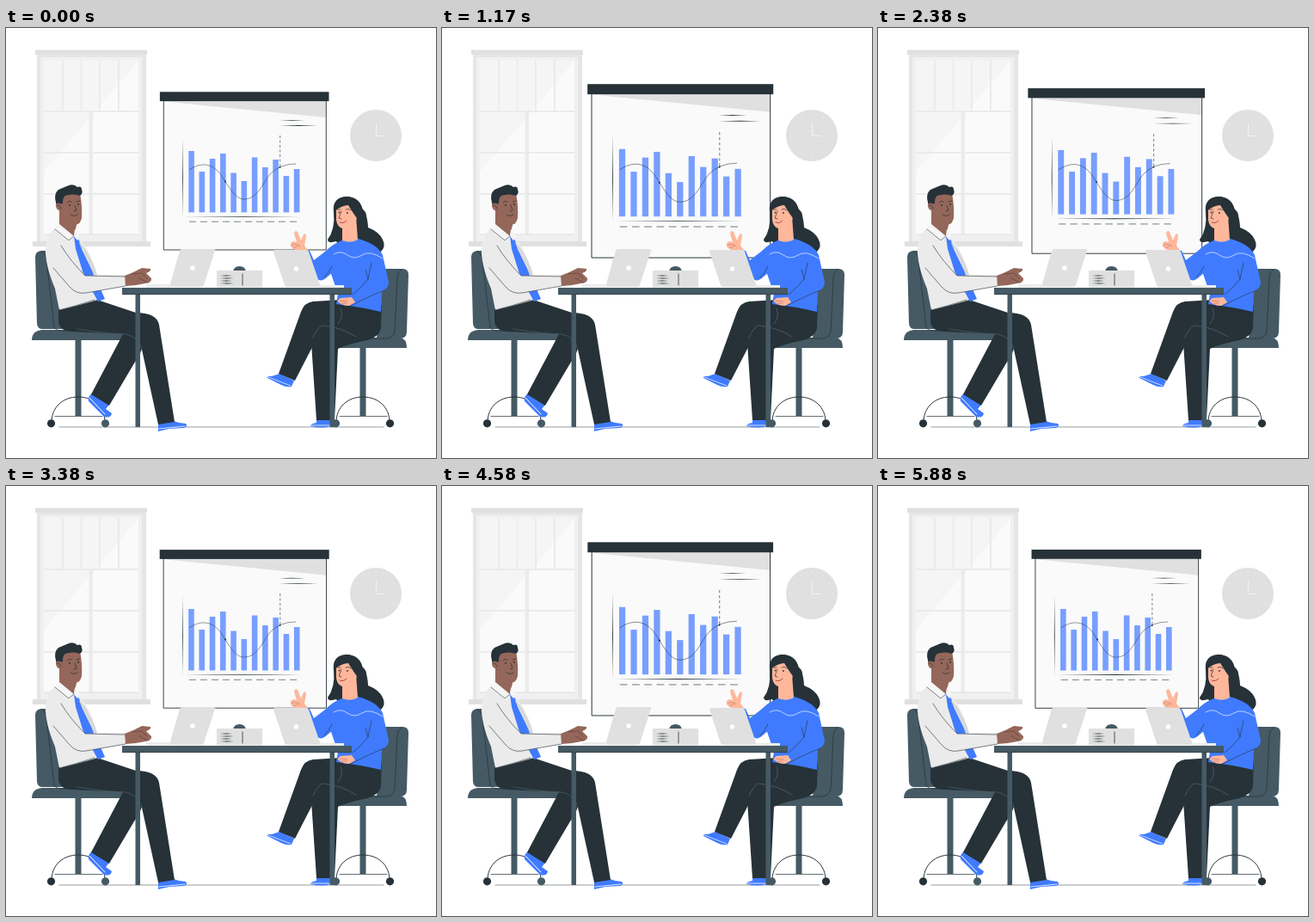
An HTML page with a canvas that plays this animation: 500x500 px, repeating every 5.93 s.

```html
<!DOCTYPE html>
<html lang="en">
<head>
<meta charset="utf-8">
<title>Office presentation</title>
<style>
html, body { margin: 0; width: 100%; height: 100%; overflow: hidden; background: #fff; }
canvas { display: block; width: 100vw; height: 100vh; }
</style>
</head>
<body>
<canvas id="stage" width="500" height="500"></canvas>
<script>
const ctx = document.getElementById('stage').getContext('2d');
const LOOP = 5930;
const DARK = '#263238', SLATE = '#455a64', BLUE = '#407bff', GREY = '#e0e0e0';
const BROWN = '#94675a', PEACH = '#ffb79b', SHIRT = '#ebebeb';

function fill(color, d, g = ctx) {
  g.fillStyle = color;
  g.fill(new Path2D(d));
}
function line(color, width, d, g = ctx, dash = []) {
  g.strokeStyle = color;
  g.lineWidth = width;
  g.setLineDash(dash);
  g.stroke(new Path2D(d));
}
function rect(color, x, y, w, h, g = ctx) {
  g.fillStyle = color;
  g.fillRect(x, y, w, h);
}
function dot(color, x, y, r, g = ctx) {
  g.fillStyle = color;
  g.beginPath();
  g.arc(x, y, r, 0, 7);
  g.fill();
}
// Straight pen stroke that thins out at both ends
function taper(x0, y0, x1, y1, g = ctx) {
  const mx = (x0 + x1) / 2, my = (y0 + y1) / 2;
  const nx = y1 === y0 ? 0 : .8, ny = .8 - nx;
  fill(DARK, `M${x0} ${y0}Q${mx - nx} ${my - ny} ${x1} ${y1}Q${mx + nx} ${my + ny} ${x0} ${y0}Z`, g);
}
function layer(paint) {
  const c = document.createElement('canvas');
  c.width = c.height = 500;
  const g = c.getContext('2d');
  g.lineCap = g.lineJoin = 'round';
  paint(g);
  return c;
}

function drawWindow(g) {
  rect('#e6e6e6', 36, 31, 127, 218, g);
  rect(GREY, 34, 25.5, 130, 5.5, g);
  rect('#f0f0f0', 40, 34, 118, 214, g);
  rect('#f5f5f5', 44, 37, 110, 203, g);
  fill('#fafafa', 'M154 38V240H44V167Z', g);
  for (const x of [66, 87.5, 109, 131]) rect('#ebebeb', x - 1, 37, 2, 60, g);
  for (const y of [97, 145, 193]) rect('#ebebeb', 44, y - 1, 110, 2, g);
  rect('#ebebeb', 96.5, 97, 4.5, 143, g);
  rect('#e6e6e6', 44, 239.5, 110, 1.5, g);
  rect(GREY, 31, 248, 137, 6, g);
}

function drawClock(g) {
  dot(GREY, 430, 125, 30, g);
  for (let i = 0; i < 12; i++) {
    const a = i * Math.PI / 6, c = Math.cos(a), s = Math.sin(a);
    line('#ebebeb', 1, `M${430 + 23 * c} ${125 + 23 * s}L${430 + 25 * c} ${125 + 25 * s}`, g);
  }
  line('#f2f2f2', 1, 'M430.500 111V125.500H440', g);
}

// Post, curved feet and casters shared by both chairs
function chairBase(g, x, top, leftColor, rightColor) {
  rect(SLATE, x - 3.5, top, 7, 451 - top, g);
  line(DARK, 1, `M${x - 31} 458C${x - 31} 441 ${x - 18} 429 ${x} 429S${x + 31} 441 ${x + 31} 458`, g);
  line(DARK, .7, `M${x - 27} 451.500H${x + 28}`, g);
  dot(leftColor, x - 31.5, 459.8, 4.6, g);
  dot(rightColor, x + 31.5, 459.8, 4.6, g);
}

function drawMan(g) {
  chairBase(g, 84, 362, DARK, SLATE);
  fill(SLATE, 'M34 266Q34 260 41 259H52Q59 259 60 267L69 350H42Q37 350 36 344Z', g);
  fill(SLATE, 'M42 351H132Q137 351 137 357V363H30Q30 352 42 351Z', g);
  line(DARK, .7, 'M41 260Q46 262 47 269L56 348Q58 352 66 352H130', g);

  // far leg and shoe
  fill(BLUE, 'M100 425L120 438 116 443 123 448Q122 454 114 452L96 434Q95 428 100 425Z', g);
  line('#fff', 1, 'M97 430L115 449', g);
  fill(DARK, 'M137 354Q158 348 160 365Q158 378 149 390L120 439 99 426Z', g);
  // near leg and shoe
  fill(BLUE, 'M177 459L195 457Q202 460 209 460Q212 463 207 465L190 466 177 469Z', g);
  line('#fff', .8, 'M178 466L208 463', g);
  fill(DARK, 'M61 326Q80 312 106 316L151 331Q175 331 178 345L196 458 177 461 158 374Q154 358 140 356L76 353Q61 352 61 340Z', g);
  line('#607078', .5, 'M83 350Q120 356 139 356Q154 359 158 373', g);

  // shirt and tie
  fill(SHIRT, 'M60 230Q49 237 46 255Q45 275 57 303L62 328Q83 323 107 316L105 283Q96 255 82 240Z', g);
  fill(BLUE, 'M79 242L85 247 88 257 104 290 115 315 107 318 91 289 81 257Z', g);
  fill('#d8d8d8', 'M87 250Q100 266 106 287L103 291Q99 275 85 250Z', g);
  fill(SHIRT, 'M48 248Q59 243 68 257L92 288 138 287 140 300 93 308Q80 310 72 300Q49 278 46 260Z', g);
  line(DARK, .6, 'M64 253Q74 270 92 288L138 289M139 300L93 308Q82 310 74 301L55 279M62 328Q82 323 103 316', g);

  // neck, collar, head
  fill(BROWN, 'M62 210L84 222 80 237 79 243Q68 236 62 230Z', g);
  fill('#f5f5f5', 'M62 228L79 242 74 249 56 234Z', g);
  fill('#f5f5f5', 'M80 234L86 242 83 247 79 242Z', g);
  line(DARK, .6, 'M57 234L73 247 79 242', g);
  fill(BROWN, 'M64 193L86 192Q89 208 88 221Q86 230 79 228Q66 225 64 212Z', g);
  fill(DARK, 'M64 210Q58 208 58 203Q55 193 61 188Q68 185 73 183Q79 181 83 185Q88 183 88 188Q90 192 86 195Q78 192 69 195Q66 197 66 203Z', g);
  fill(BROWN, 'M66 205Q58 201 58 207Q59 214 66 212Z', g);
  line(DARK, .7, 'M60 206Q64 207 64 210M71 203Q73 200 76 202M82 202L86 201M80 206L82 212 79 213M75 217Q79 220 83 217', g);
  dot(DARK, 74, 206, .9, g);
  dot(DARK, 84, 205, .9, g);
}

function drawWoman(g) {
  chairBase(g, 415, 371, SLATE, DARK);
  fill(SLATE, 'M438 280H461Q468 280 468 287L466 353Q466 361 458 361H431Z', g);
  fill(SLATE, 'M386 360H458Q466 361 466 372H381Q380 361 386 360Z', g);
  line(DARK, .7, 'M460 281Q455 284 455 291L452 353Q450 360 443 361H410', g);

  // hair behind the shoulders
  fill(DARK, 'M381 214Q379 197 396 196Q410 196 414 210Q419 214 419 218Q421 227 421 232Q434 237 438 246Q442 254 436 260Q430 266 423 263L392 260 384 248Q374 251 374 246Q383 234 381 214Z', g);

  // legs and shoes
  fill(BLUE, 'M318 402L335 410 332 417Q326 418 320 415L304 407Q304 404 309 405Z', g);
  line('#fff', .7, 'M305 406L331 416', g);
  fill(BLUE, 'M361 456L382 455 377 463Q368 466 354 463Q354 460 361 459Z', g);
  line('#fff', .8, 'M355 462H377', g);
  fill(DARK, 'M375 335Q356 350 355 366L361 456H382L386 373Q396 368 420 363Q437 358 436 345Z', g);
  fill(DARK, 'M357 318Q347 319 343 330L317 402 336 410 368 348 400 366 425 361Q436 356 436 346L437 322 390 316Z', g);
  line('#607078', .6, 'M367 346Q362 349 357 360M368 346Q390 348 407 359M389 326Q393 336 386 344', g);

  // raised arm and hand
  fill(PEACH, 'M351 258L344 266 335 257Q330 255 331 250L334 248 338 249 335 239Q336 234 339 237L343 247 346 240Q349 238 349 242L347 253Z', g);
  line('#b66b59', .5, 'M332 253Q337 249 342 254M334 256L340 253', g);
  fill(BLUE, 'M391 247Q381 250 371 260L358 270 353 259Q348 258 346 264L362 292Q367 296 374 289L392 274Z', g);

  // body
  fill(BLUE, 'M390 247L409 245Q432 251 438 264L445 296Q445 302 437 307L436 330Q411 324 384 321L386 309 377 283 383 256Z', g);
  line('#dce6ff', .8, 'M381 263Q389 258 397 264T414 264T438 268', g);
  line(DARK, .6, 'M425 273L421 292Q414 301 403 310M421 292L418 281M399 324Q426 310 440 305M379 277Q375 286 370 290', g);
  fill(PEACH, 'M402 313L389 314Q384 317 387 319Q391 323 399 323L406 319Z', g);
  line('#b66b59', .6, 'M388 317L397 318M390 320L396 320', g);

  // neck and face
  fill(PEACH, 'M391 228L407 219 409 246Q401 251 391 247Z', g);
  fill(PEACH, 'M384 208L398 202 407 213Q410 221 405 227Q398 234 391 233Q385 231 384 223Z', g);
  fill(DARK, 'M382 213Q380 197 396 196Q412 197 415 212L414 234 408 231Q410 222 405 217Q401 211 398 206Q391 206 382 213Z', g);
  line(DARK, .7, 'M385 211L389 211M395 211Q398 209 401 212M390 213L387 221 390 222', g);
  line('#b34d4d', 1, 'M388 226Q392 228 396 224', g);
  dot(DARK, 387.5, 214.5, .9, g);
  dot(DARK, 397, 215, .9, g);
}

function drawTable(g) {
  // left laptop
  fill(GREY, 'M204 257H242Q244 257 243 259L230 299Q229 301 227 301H190L202 259Z', g);
  fill('#ebebeb', 'M163 298H192V301.5H163Z', g);
  dot('#fff', 217, 279, 2.7, g);
  // right laptop
  fill(GREY, 'M312 258H350L352 260 366 301H326L324 299 311 260Z', g);
  fill('#ebebeb', 'M364 299H393V302H364Z', g);
  dot('#fff', 337.5, 280, 2.7, g);
  // projector
  fill(SLATE, 'M264 283Q265 277 271.500 277T279 283Z', g);
  rect(GREY, 245, 282, 53, 19.5, g);
  for (let i = 0; i < 4; i++) taper(249, 288 + i * 3, i % 2 ? 265 : 263, 288 + i * 3, g);
  line(DARK, .8, 'M275 286V299', g);
  // desk
  rect(SLATE, 135, 302, 267, 8, g);
  rect(SLATE, 150.5, 310, 5.5, 154, g);
  rect(SLATE, 376.5, 310, 5.5, 154, g);
  line(DARK, .6, 'M136 309.700H401', g);
  // resting hands
  fill(BROWN, 'M138 288L148 284 158 279 168 280Q169 283 163 285L169 291Q170 296 162 297L151 299 139 300Z', g);
  line('#5a3a32', .6, 'M147 286L158 285 164 291M155 291L165 296', g);
}

const back = layer(g => {
  rect('#fff', 0, 0, 500, 500, g);
  drawWindow(g);
  drawClock(g);
  line('#8b9296', .9, 'M62 464H439', g);
});
const front = layer(g => {
  drawMan(g);
  drawWoman(g);
  drawTable(g);
});

const BAR_TOPS = [143, 167, 152, 146, 168.5, 178, 150.5, 162, 153, 172, 164];

function drawBoard(scale) {
  ctx.save();
  ctx.translate(277.2, 166);
  ctx.scale(scale, scale);
  ctx.translate(-277.2, -166);
  rect('#fafafa', 183.3, 80, 189, 178);
  fill(GREY, 'M183.300 85H372.300V104L189 86Z');
  line(DARK, .9, 'M183.300 80H372.300V258H183.300Z');
  rect(DARK, 178.9, 74.3, 196.6, 10.8);

  BAR_TOPS.forEach((y, i) => rect('#789fff', 212.3 + i * 12.25, y, 6.6, 214.4 - y));
  taper(205.5, 128, 205.5, 220);
  taper(208, 219.3, 343, 219.3);
  line(DARK, .6, 'M213 225.200H342', ctx, [8, 5]);
  line(DARK, .5, 'M213 165C226 156 240 156 251 172C262 190 268 199 277 199C293 199 299 179 307 170Q318 158 337 158');
  line(DARK, .6, 'M318.700 125V162', ctx, [3, 2.5]);
  taper(318, 107.3, 347, 107.3);
  taper(318, 113.5, 362, 113.5);
  dot(DARK, 255, 178.5, 1);
  dot(DARK, 318.5, 162, 1);
  ctx.restore();
}

// [time, scale] turning points of the board's zoom
const ZOOM = [[0, 1], [1150, 1.1], [3430, 1], [4610, 1.1], [LOOP, 1]];

function zoomAt(t) {
  const i = ZOOM.findIndex(k => k[0] > t);
  const [t0, a] = ZOOM[i - 1], [t1, b] = ZOOM[i];
  return a + (b - a) * (t - t0) / (t1 - t0);
}

const start = performance.now();
function frame(now) {
  const t = Math.max(0, now - start) % LOOP;
  ctx.drawImage(back, 0, 0);
  drawBoard(zoomAt(t));
  ctx.drawImage(front, 0, 0);
  requestAnimationFrame(frame);
}
frame(start);
</script>
</body>
</html>
```
